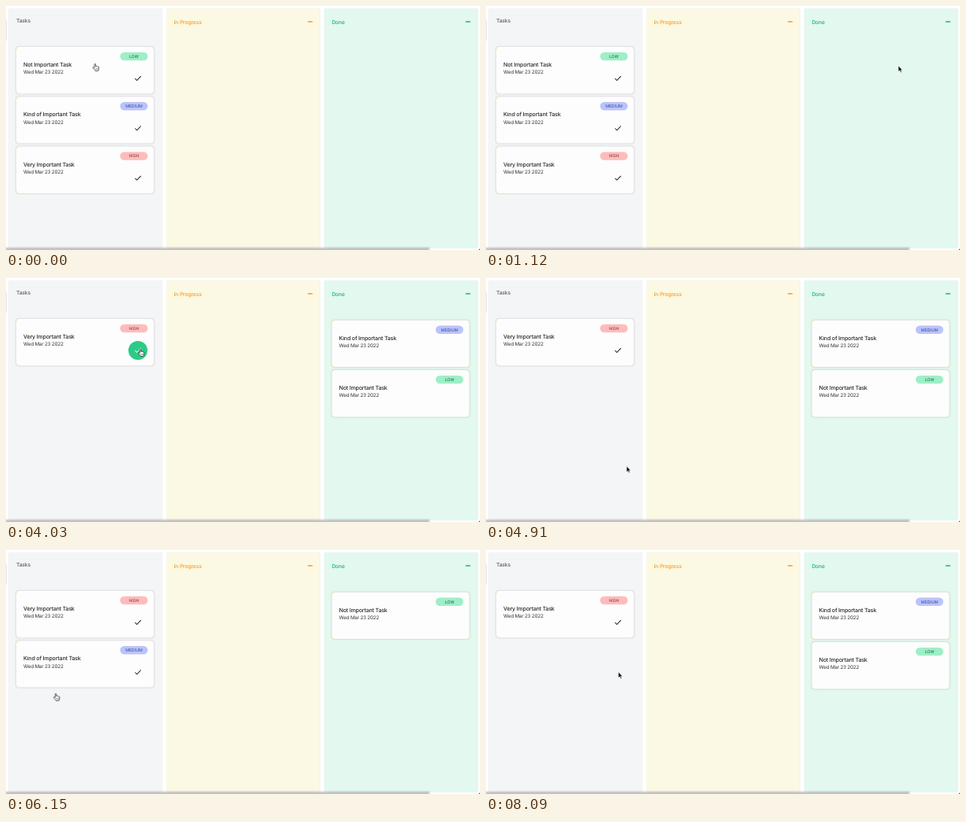
An HTML page that plays this animation: 600x310 px, repeating every 9.3 s.

```html
<!DOCTYPE html>
<html lang="en">
<head>
<meta charset="utf-8">
<title>Task board</title>
<style>
  html, body { margin: 0; width: 100%; height: 100%; overflow: hidden; background: #fff; }
  svg { display: block; width: 100vw; height: 100vh; }
  text { font-family: Inter, Roboto, sans-serif; text-rendering: geometricPrecision; }
  .head { font-size: 6.7px; font-weight: 500; letter-spacing: -.1px; }
  .title { font-size: 7.1px; font-weight: 500; letter-spacing: -.2px; fill: #26282c; }
  .date { font-size: 6.3px; letter-spacing: -.2px; fill: #33363b; }
  .tag { font-size: 5.2px; text-anchor: middle; }
  .column { filter: drop-shadow(0 .4px .6px rgba(0, 0, 0, .13)); }
  .paper { fill: #fdfdfd; filter: drop-shadow(0 .7px .8px rgba(0, 0, 0, .22)); }
  .corner { fill: none; stroke: #eeec8a; stroke-width: .9; opacity: .8; }
  .tick { fill: none; stroke-width: 1.05; }
  .ghost { opacity: .72; filter: drop-shadow(0 1px 2.5px rgba(0, 0, 0, .38)); }
  .edge { fill: #777; opacity: .5; filter: blur(1.2px); }
</style>
</head>
<body>
<svg id="stage" viewBox="0 0 600 310" preserveAspectRatio="none">
  <rect width="600" height="310" fill="#fff"/>
  <rect x="0" y="18" width=".7" height="26" fill="#dadada"/>
</svg>
<script>
const LOOP = 9300;
const FADE = 120;
const stage = document.getElementById('stage');

const kinds = {
  low: { title: 'Not Important Task', tag: 'LOW', fill: [157, 239, 199], ink: '#1f5a45' },
  medium: { title: 'Kind of Important Task', tag: 'MEDIUM', fill: [186, 196, 251], ink: '#3b4190' },
  high: { title: 'Very Important Task', tag: 'HIGH', fill: [253, 188, 188], ink: '#7b3434' }
};

// Board contents from each time on
const states = [
  { at: 0, tasks: ['low', 'medium', 'high'], done: [] },
  { at: 1150, tasks: ['medium', 'high'], done: ['low'] },
  { at: 3610, tasks: ['high'], done: ['medium', 'low'] },
  { at: 6030, tasks: ['high', 'medium'], done: ['low'] },
  { at: 7970, tasks: ['high'], done: ['medium', 'low'] }
];

const linear = u => u;
const easeOut = u => 1 - (1 - u) ** 2;
const easeBoth = u => u * u * (3 - 2 * u);

// Pointer strokes: start, end, easing, Bezier control points
const moves = [
  [30, 60, linear, [112.7, 73.5], [112, 73.5], [111.5, 73.5], [111, 73.5]],
  [210, 1070, easeBoth, [148, 77], [230, 155], [410, 160], [522, 76]],
  [1610, 2500, easeBoth, [522, 76], [390, 122], [245, 122], [170, 90.5]],
  [4550, 5470, easeBoth, [170, 90.5], [95, 300], [300, 335], [457.8, 75.5]],
  [5520, 5610, linear, [400, 75.5], [340, 75.5], [275, 76], [213.3, 76.8]],
  [5610, 5990, easeOut, [213.3, 76.8], [110, 77], [20, 140], [63, 182.5]],
  [6480, 7350, easeBoth, [63, 182.5], [85, 194], [130, 182], [167.6, 155]]
];

const drags = [
  { from: 210, to: 1120, kind: 'low', grab: [111, 73.5], home: [13, 52] },
  { from: 5520, to: 6030, kind: 'medium', grab: [457.8, 75.5], home: [412.5, 53.8] }
];

function el(name, attrs = {}, parent = stage, content) {
  const node = document.createElementNS('http://www.w3.org/2000/svg', name);
  for (const key in attrs) node.setAttribute(key, attrs[key]);
  if (content) node.textContent = content;
  parent.appendChild(node);
  return node;
}

const show = (node, on) => node.setAttribute('display', on ? 'inline' : 'none');
const place = (node, [x, y]) => node.setAttribute('transform', `translate(${x} ${y})`);
const rgb = c => `rgb(${c.map(Math.round)})`;
const slot = (column, i) =>
  column === 'tasks' ? [13, 52 + 63.3 * i] : [412.5, 53.8 + 63.3 * i];

function makeColumn(x, fill, name, ink, baseline, minus) {
  el('rect', { class: 'column', x, y: 3, width: 194.5, height: 304.5, rx: 3, fill });
  el('text', { class: 'head', x: x + 9.6, y: baseline, fill: ink }, stage, name);
  if (minus) el('rect', { x: x + 179, y: 19.3, width: 6, height: 1.5, rx: .4, fill: ink });
}

function makeCard(kind, className) {
  const { title, tag, fill, ink } = kinds[kind];
  const root = el('g', className ? { class: className } : {});
  el('rect', { class: 'paper', width: 174, height: 59.3, rx: 3 }, root);
  el('path', {
    class: 'corner',
    d: 'M.2 3Q.2.2 3 .2M171 .2Q173.8.2 173.8 3M173.8 56.3Q173.8 59.1 171 59.1M3 59.1Q.2 59.1.2 56.3'
  }, root);
  el('text', { class: 'title', x: 9, y: 25.1 }, root, title);
  el('text', { class: 'date', x: 9, y: 34.4 }, root, 'Wed Mar 23 2022');
  const badge = el('rect', { x: 131.4, y: 6.8, width: 35, height: 10.4, rx: 5.2, fill: rgb(fill) }, root);
  el('text', { class: 'tag', x: 149, y: 13.9, fill: ink }, root, tag);
  const check = el('g', {}, root);
  const disc = el('circle', { cx: 154, cy: 40, r: 12.1, fill: '#2bcb87' }, check);
  const tick = el('path', { class: 'tick', d: 'M150.4 40.2L152.7 42.5L157.8 37.2' }, check);
  return { root, badge, check, disc, tick };
}

function setHover(card, on) {
  show(card.disc, on);
  card.tick.setAttribute('stroke', on ? '#d9fbea' : '#222');
}

makeColumn(3.3, '#f4f5f7', 'Tasks', '#555a63', 20.9, false);
makeColumn(203, '#fbf8e3', 'In Progress', '#f59e1b', 22.5, true);
makeColumn(402.8, '#e3f8ee', 'Done', '#17b183', 22.5, true);
el('rect', { class: 'edge', x: -5, y: 307.2, width: 541, height: 4 });
el('path', { d: 'M600 307.5V310H597.5Q600 310 600 307.5Z', fill: '#111' });

const cards = {};
for (const kind in kinds) cards[kind] = makeCard(kind);

for (const drag of drags) {
  drag.card = makeCard(drag.kind, 'ghost');
  setHover(drag.card, false);
  show(drag.card.check, drag.home[0] < 200);
}

const pointer = el('g');
const arrow = el('path', {
  d: 'M0 0V7.3L1.7 5.8L2.9 8.4L4.1 7.9L3 5.4H5.1Z',
  fill: '#111', stroke: '#fff', 'stroke-width': .45
}, pointer);
const hand = el('g', { stroke: '#222', 'stroke-width': .75, 'stroke-linejoin': 'round' }, pointer);
el('path', {
  fill: '#fff',
  d: 'M-.8 .8a.8 .8 0 0 1 1.6 0V3.2c.4-.5 1.2-.4 1.4 .1c.4-.4 1.1-.2 1.3 .3c.6-.3 1.3 0 1.3 .8V6c0 1.4-.6 2.2-.9 2.9H.3C0 7.8-1.6 6.4-2.4 5.3c-.6-.8 .3-1.5 1-.9l.6 .6Z'
}, hand);
el('path', { d: 'M1 5.6V7.4M2.2 5.6V7.4M3.4 5.6V7.4', 'stroke-width': .45 }, hand);
const plus = el('g', {}, pointer);
el('circle', { cx: 5, cy: 10.2, r: 4.7, fill: '#27a844' }, plus);
el('path', { d: 'M5 7.5V12.9M2.3 10.2H7.7', stroke: '#fff', 'stroke-width': 1.2 }, plus);

function bezier(points, u) {
  const v = 1 - u;
  const weights = [v * v * v, 3 * v * v * u, 3 * v * u * u, u * u * u];
  return [0, 1].map(axis => points.reduce((sum, p, i) => sum + p[axis] * weights[i], 0));
}

function pointerAt(t) {
  const current = moves.filter(m => m[0] <= t).pop();
  if (!current) return moves[0][3];
  const [start, end, ease, ...points] = current;
  return bezier(points, ease(Math.min(1, (t - start) / (end - start))));
}

function inCard([x, y], [left, top]) {
  return x >= left && x <= left + 174 && y >= top && y <= top + 59.3;
}

function badgeColor(kind, previous, age) {
  const to = kinds[kind].fill;
  if (!previous || age >= FADE) return rgb(to);
  const from = kinds[previous].fill;
  return rgb(to.map((c, i) => from[i] + (c - from[i]) * age / FADE));
}

function draw(t) {
  const index = states.findLastIndex(s => s.at <= t);
  const state = states[index];
  const before = states[index - 1];
  const spot = pointerAt(t);
  const dragging = drags.some(d => t >= d.from && t < d.to);
  let overCard = false;

  for (const kind in cards) show(cards[kind].root, false);
  for (const column of ['tasks', 'done']) {
    state[column].forEach((kind, i) => {
      const card = cards[kind];
      const at = slot(column, i);
      const hover = Math.hypot(spot[0] - at[0] - 154, spot[1] - at[1] - 40) < 12;
      show(card.root, true);
      place(card.root, at);
      show(card.check, column === 'tasks');
      setHover(card, hover && !dragging);
      card.badge.setAttribute('fill', badgeColor(kind, before && before[column][i], t - state.at));
      overCard = overCard || inCard(spot, at);
    });
  }

  for (const { from, to, grab, home, card } of drags) {
    show(card.root, t >= from && t < to);
    place(card.root, home.map((v, axis) => v + spot[axis] - grab[axis]));
  }

  // The hand lingers after the second drop until the pointer moves
  const lingering = t >= 6030 && t < 6480;
  const useHand = !dragging && (overCard || lingering);
  place(pointer, spot);
  show(hand, useHand);
  show(arrow, !useHand);
  show(plus, dragging);
}

const begin = performance.now();
function tick() {
  draw((performance.now() - begin) % LOOP);
  requestAnimationFrame(tick);
}
tick();
</script>
</body>
</html>
```
